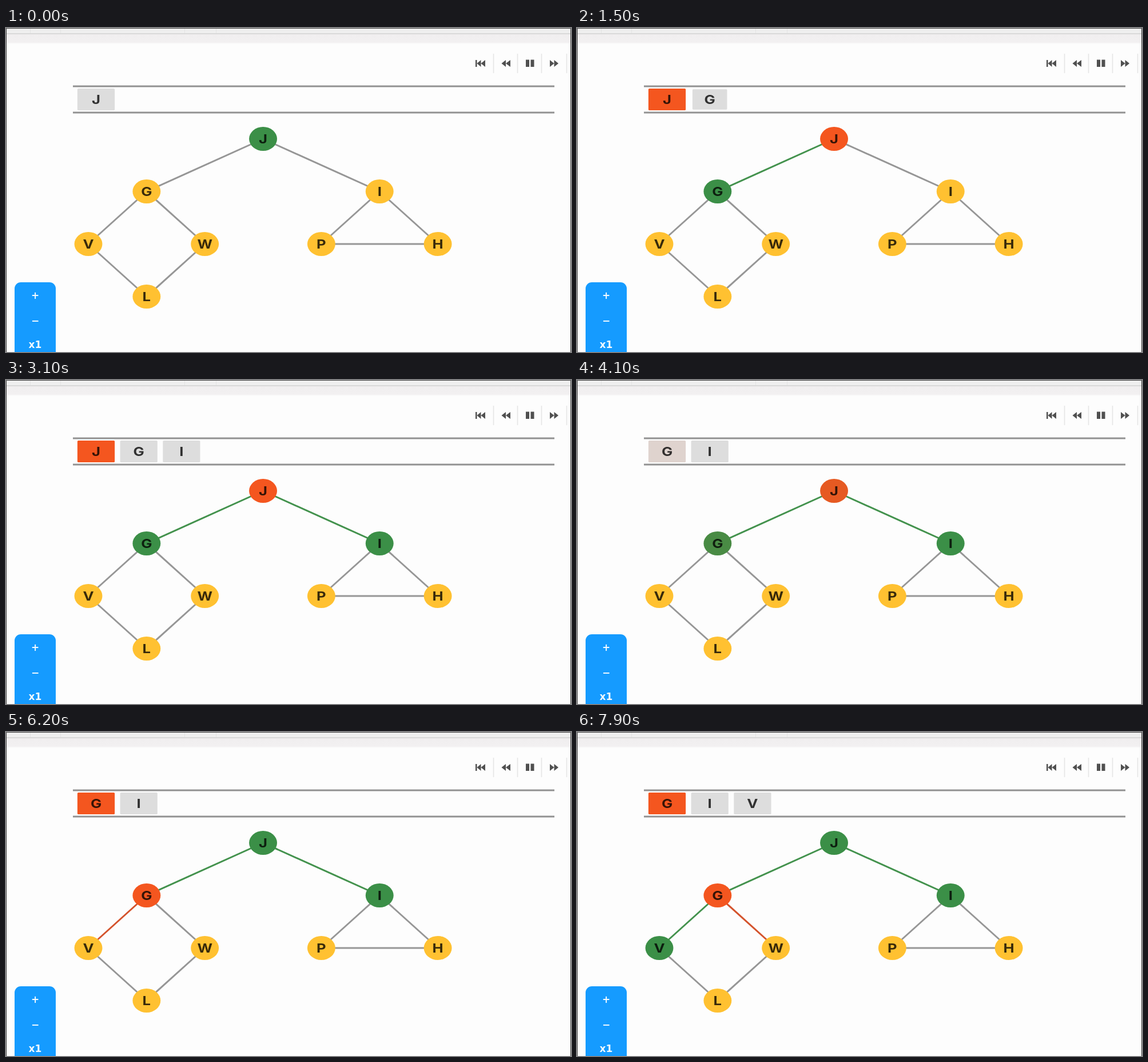
Write an HTML page that moves like this. It is 988 px wide and 567 px high and loops after 8 s.

```html
<!DOCTYPE html>
<html lang="en">
<head>
<meta charset="utf-8">
<title>Breadth-first search</title>
<style>
  html, body { margin: 0; width: 100%; height: 100%; overflow: hidden; background: #fdfdfd; }
  svg { display: block; width: 988px; height: 567px; }
  text { text-anchor: middle; font: 700 22px Inter, "Liberation Sans", sans-serif; fill: #000; fill-opacity: .78; }
  .zoom text { font: 700 17px "DejaVu Sans", sans-serif; fill: #fff; fill-opacity: .95; }
</style>
</head>
<body>
<svg viewBox="0 0 988 567">
  <defs>
    <linearGradient id="bar" x1="0" y1="0" x2="0" y2="1">
      <stop offset="0" stop-color="#f0eeef"/>
      <stop offset=".82" stop-color="#f2f0f1"/>
      <stop offset="1" stop-color="#fdfdfd"/>
    </linearGradient>
  </defs>
  <rect width="988" height="567" fill="#fdfdfd"/>
  <rect width="988" height="10" fill="#efefef"/>
  <rect y="10" width="988" height="18" fill="url(#bar)"/>
  <path d="M0 10H988" stroke="#d2d2d2" stroke-width="1.5"/>
  <path d="M42.500 1V9M95.500 1V9M312.500 1V9M367.500 1V9" stroke="#e4e4e4"/>
  <path d="M.5 567V.5H987.500V567" fill="none" stroke="#3c3c3c"/>

  <path d="M852.500 45V79M894.500 45V79M936.500 45V79M980.500 45V79" stroke="#e4e4e4" stroke-width="1.500"/>
  <path fill="#505050" d="M821 56h2.500v12h-2.500zM830.500 56v12l-7-6zM838 56v12l-7.500-6z
    M874 56v12l-7.500-6zM882 56v12l-8-6zM909 55.500h6v12.500h-6zM917.500 55.500h6v12.500h-6z
    M951 56v12l7.500-6zM958.500 56v12l7.500-6z"/>

  <path d="M117 102H959M117 148H959" stroke="#919191" stroke-width="2.800"/>
  <g id="queue"></g>
  <g id="edges" stroke-width="3"></g>
  <g id="nodes"></g>

  <g class="zoom">
    <rect x="15" y="445" width="72" height="140" rx="11" fill="#159bff"/>
    <text x="51" y="474">+</text>
    <text x="51" y="518">−</text>
    <text x="51" y="560">x1</text>
  </g>
</svg>
<script>
const LOOP = 8000, FADE = 300, WIDEN = 1.165;
const YELLOW = [255, 193, 49], GREEN = [59, 143, 71], ORANGE = [244, 86, 31];
const LINE = [150, 150, 150], LINE_GREEN = [67, 146, 77], LINE_ORANGE = [212, 83, 44];
const TILE = [221, 221, 221];

// Colour lists: starting colour, then [time, next colour] pairs.
const nodes = {
  J: [3, 0, GREEN, [100, ORANGE], [4050, GREEN]],
  G: [1, 1, YELLOW, [900, GREEN], [4050, ORANGE]],
  I: [5, 1, YELLOW, [2450, GREEN]],
  V: [0, 2, YELLOW, [6700, GREEN]],
  W: [2, 2, YELLOW],
  P: [4, 2, YELLOW],
  H: [6, 2, YELLOW],
  L: [1, 3, YELLOW]
};
const edges = {
  JG: [LINE, [450, LINE_ORANGE], [900, LINE_GREEN], [4700, LINE_ORANGE], [5600, LINE_GREEN]],
  JI: [LINE, [1800, LINE_ORANGE], [2450, LINE_GREEN]],
  GV: [LINE, [5900, LINE_ORANGE], [6750, LINE_GREEN]],
  GW: [LINE, [7500, LINE_ORANGE]],
  VL: [LINE], WL: [LINE], IP: [LINE], IH: [LINE], PH: [LINE]
};
// Letter, slot, time of entry, colours
const queue = [
  ["J", 0, -1000, [TILE, [100, ORANGE]]],
  ["G", 1, 900, [TILE, [4050, ORANGE]]],
  ["I", 2, 2450, [TILE]],
  ["V", 3, 6700, [TILE]]
];
const SHIFT = 3400;

const ease = (t, start, span) => {
  const p = Math.min(1, Math.max(0, (t - start) / span));
  return p * p * (3 - 2 * p);
};
const colour = ([first, ...steps], t) => {
  const mixed = steps.reduce((from, [at, to]) => {
    const p = ease(t, at, FADE);
    return from.map((c, i) => c + (to[i] - c) * p);
  }, first);
  return `rgb(${mixed.map(Math.round)})`;
};
const add = (parent, tag, attrs, content = "") => {
  const el = document.createElementNS("http://www.w3.org/2000/svg", tag);
  for (const key in attrs) el.setAttribute(key, attrs[key]);
  el.textContent = content;
  return parent.appendChild(el);
};
const layer = id => document.getElementById(id);
const place = name => [144 + nodes[name][0] * 101.85, 194 + nodes[name][1] * 92];

const edgeParts = Object.entries(edges).map(([[a, b], colours]) => {
  const [x1, y1] = place(a), [x2, y2] = place(b);
  return [add(layer("edges"), "line", { x1, y1, x2, y2 }), colours];
});
const nodeParts = Object.entries(nodes).map(([name, [, , ...colours]]) => {
  const g = add(layer("nodes"), "g", { transform: `translate(${place(name)}) scale(${WIDEN} 1)` });
  const disc = add(g, "circle", { r: 21 });
  add(g, "text", { y: 8 }, name);
  return [disc, colours];
});
const queueParts = queue.map(([name, slot, enter, colours]) => {
  const g = add(layer("queue"), "g", {});
  const tile = add(g, "rect", { x: -28, y: -19, width: 56, height: 38, rx: 1.5 });
  add(g, "text", { y: 8 }, name);
  return { g, tile, slot, enter, colours };
});

function draw(t) {
  for (const [line, colours] of edgeParts) line.setAttribute("stroke", colour(colours, t));
  for (const [disc, colours] of nodeParts) disc.setAttribute("fill", colour(colours, t));
  const shift = ease(t, SHIFT, 450);
  for (const { g, tile, slot, enter, colours } of queueParts) {
    const x = 157.5 + 74.7 * (slot - shift);
    g.setAttribute("transform", `translate(${x} 125) scale(${WIDEN} 1)`);
    g.setAttribute("opacity", ease(t, enter, 200) * (slot ? 1 : 1 - shift));
    tile.setAttribute("transform", `scale(${ease(t, enter + 300, 360)})`);
    tile.setAttribute("fill", colour(colours, t));
  }
}
function tick() {
  draw(performance.now() % LOOP);
  requestAnimationFrame(tick);
}
tick();
</script>
</body>
</html>
```
